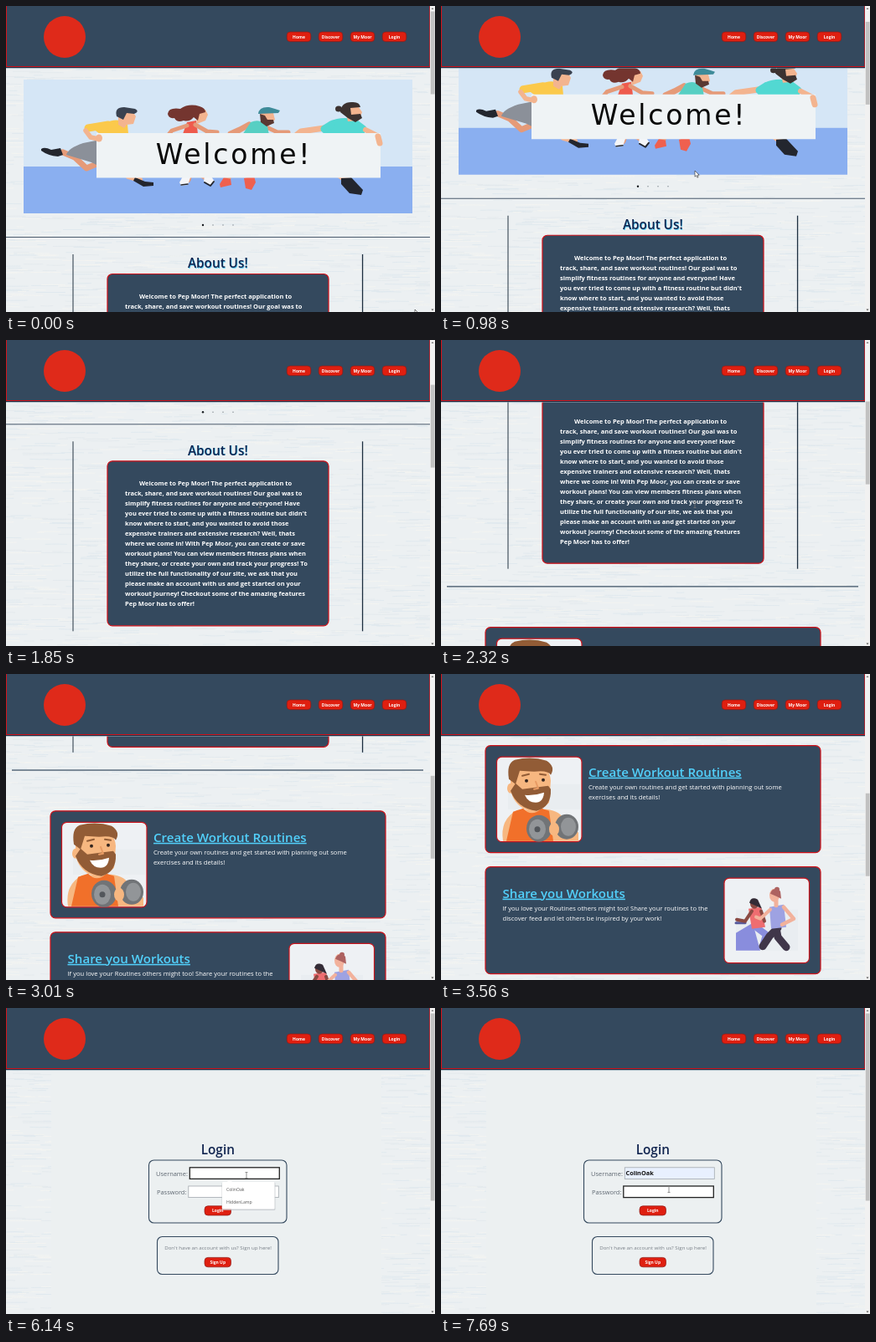
An HTML page for the animation above (8 s loop, 512 px wide and 366 px high).

```html
<!DOCTYPE html>
<html lang="en">
<head>
<meta charset="utf-8">
<title>Workout site</title>
<style>
html, body { margin: 0; width: 100%; height: 100%; overflow: hidden; background: #ecf0f2; }
svg { display: block; width: 100vw; height: 100vh; }
text { font-family: "Open Sans", "Noto Sans", sans-serif; white-space: pre; }
.mid { text-anchor: middle; }
.title { font-weight: 600; font-size: 15.3px; fill: #10244f; }
.about { font-weight: 700; font-size: 7.5px; fill: #fff; }
.link { font-weight: 600; font-size: 15.1px; fill: #52d0fb; text-decoration: underline; }
.body { font-weight: 500; font-size: 7.6px; fill: #fff; }
.label { font-size: 7.45px; fill: #5d6670; }
.note { font-size: 6.15px; fill: #777e86; }
.item { font-size: 5.1px; fill: #555; }
.value { font-weight: 700; font-size: 7.3px; fill: #111; }
.btn { font-weight: 700; font-size: 5px; fill: #fff; text-anchor: middle; }
.slide { font: 33px "DejaVu Sans", sans-serif; letter-spacing: 2.8px; fill: #080808; }
.panel { fill: #34495e; stroke: #d01018; stroke-width: 1.2; }
.thumbnail { fill: #eef1f4; stroke: #c9141c; stroke-width: 1.2; }
.form { fill: #ecf0f1; stroke: #34495e; stroke-width: 1.1; }
.limb { fill: none; stroke-linecap: round; stroke-linejoin: round; }
</style>
</head>
<body>
<svg id="stage" viewBox="0 0 512 366" preserveAspectRatio="none"></svg>
<script>
const LOOP = 8000;

const rect = (x, y, w, h, fill, extra = '') =>
  `<rect x="${x}" y="${y}" width="${w}" height="${h}" fill="${fill}" ${extra}/>`;
const box = (cls, x, y, w, h, r = 6) =>
  `<rect class="${cls}" x="${x}" y="${y}" width="${w}" height="${h}" rx="${r}"/>`;
const text = (cls, x, y, s) => `<text class="${cls}" x="${x}" y="${y}">${s}</text>`;
const shape = (fill, d) => `<path fill="${fill}" d="${d}"/>`;
const limb = (color, width, d) => `<path class="limb" stroke="${color}" stroke-width="${width}" d="${d}"/>`;
const ball = (fill, x, y, rx, ry = rx) => `<ellipse cx="${x}" cy="${y}" rx="${rx}" ry="${ry}" fill="${fill}"/>`;
const button = (x, y, w, h, s) =>
  rect(x, y, w, h, '#df1f10', 'rx="4" stroke="#8d1a18" stroke-width=".7"') + text('btn', x + w / 2, y + h / 2 + 1.9, s);

function streaks() {
  let seed = 7;
  const rnd = () => (seed = seed * 16807 % 2147483647) / 2147483647;
  return ['#dde8ee', '#e2e9ed', '#f5f5f2'].map(color => {
    let d = '';
    for (let i = 0; i < 330; i++) {
      const len = 8 + rnd() * 34;
      d += `M${(rnd() * 530 - 20).toFixed(1)} ${(74 + rnd() * 292).toFixed(1)}q${(len / 2).toFixed(1)} ${(rnd() * 2 - 1).toFixed(1)} ${len.toFixed(1)} 0`;
    }
    return `<path d="${d}" fill="none" stroke="${color}" stroke-width=".8"/>`;
  }).join('');
}

function runners() {
  const pale = '#f3b48f', tan = '#e59a78', shoe = '#23262e', navy = '#3a4250';
  const behind =
    // yellow shirt, one leg kicked back
    limb(tan, 7, 'M68 175L82 181L96 194L108 189') +
    shape(shoe, 'M42 171Q46 168 54 172L65 170L68 178L62 180Q50 179 42 173Z') +
    shape('#8b9099', 'M92 164L112 160V192L102 187L72 178Q74 170 92 164Z') +
    shape('#fbc94b', 'M118 140Q134 132 145 142L146 153H112L104 147Z') +
    limb('#fbc94b', 9, 'M122 142L98 146') + limb(pale, 5.5, 'M95 149L101 157L110 159') +
    shape(pale, 'M134 126H151L155 132L152 141L144 142L141 146L134 142Z') +
    shape(navy, 'M132 132Q129 121 141 121L154 123Q160 126 153 129L144 128L140 136Z') +
    limb(pale, 6, 'M146 204L160 208') + shape(shoe, 'M154 205L166 210L176 211V215L164 216L152 209Z') +
    // red shirt, loose hair
    shape('#ee5b4d', 'M216 139L227 137L229 153H211Z') + limb(tan, 5, 'M216 143L198 149L193 155') +
    limb(tan, 5, 'M226 142L240 150L252 151') +
    shape(pale, 'M225 124L238 124L241 130L238 137L228 141Z') +
    shape('#74352f', 'M231 120Q218 116 208 123Q194 121 193 129Q194 135 201 134Q204 140 212 137Q219 139 224 133L229 137L231 129L238 127Q238 122 231 120Z') +
    limb(tan, 7, 'M219 202L217 208') + shape('#f4f5f8', 'M212 202L220 205L217 214L209 215L207 211Z') +
    limb(shoe, 1.5, 'M209 214L217 213') +
    limb(tan, 7, 'M234 202L240 206') + shape('#f4f5f8', 'M237 202L245 204L249 210L244 215L236 210Z') +
    limb(shoe, 2, 'M237 211L244 215L248 210') +
    // cap, tank top
    limb(tan, 7, 'M290 142L279 148L268 153') + limb(tan, 5, 'M311 145L324 151L337 151') +
    shape('#57cfc3', 'M292 139Q304 134 312 144L314 154H282Z') +
    shape(pale, 'M304 128H319L321 136L312 143L304 137Z') +
    shape('#5a3932', 'M303 129L309 131L312 136L319 136L320 140L311 144L304 139Z') +
    shape('#3e8b99', 'M301 129Q302 120 314 121L321 123L327 125L325 128Z') +
    limb(tan, 7, 'M266 203L264 209') + shape('#ef604f', 'M260 205L268 207L269 214L256 217L255 213Z') +
    limb(tan, 7, 'M288 203L292 207') + shape('#ef604f', 'M284 206L296 203L298 211L293 220L286 218Z') +
    // bun and beard
    limb(pale, 7, 'M380 146L352 150L347 154') +
    shape('#52d8d2', 'M386 138Q401 131 418 136L428 147V154H377Z') + limb('#52d8d2', 9, 'M388 142L380 147') +
    limb('#52d8d2', 9, 'M418 141L426 147') + limb(pale, 6, 'M429 148L441 154') +
    shape(pale, 'M404 121H421L425 127L421 137L408 138Z') +
    shape('#3c3230', 'M399 127Q400 115 412 115Q422 114 423 121L411 122L412 130L423 129L425 134L417 139L408 134Z') +
    ball('#3c3230', 397, 123, 4, 3.5) +
    limb(pale, 9, 'M399 202L407 208') + shape(shoe, 'M400 206L412 205L426 220L424 226L410 224L400 213Z');
  const hands = ball(pale, 111, 158, 4, 4.5) + limb(pale, 7, 'M444 156L446 164');
  return behind + rect(108, 152, 339, 53.5, '#eff3f5') + hands + text('slide mid', 272, 188.5, 'Welcome!');
}

const lifter = () => {
  const skin = '#f7b780', hair = '#925c36', metal = '#717477';
  return rect(80, 640, 86, 30, '#e9edf0') +
    shape(skin, 'M74 708Q70 682 91 671L126 670Q143 672 148 684L164 698V708Z') +
    shape('#f1702a', 'M78 708L86 673L98 669Q108 680 120 669L129 672L134 708Z') +
    shape(skin, 'M83 632Q82 616 104 615Q130 616 131 636L129 662Q116 677 98 669Q84 660 83 644Z') +
    ball(skin, 83, 645, 4, 6) +
    shape(hair, 'M83 648L89 639L97 646L112 644L128 642L131 646Q132 667 114 672Q91 669 83 648Z') +
    shape('#fff', 'M100 653Q112 654 123 650Q122 662 113 662Q104 662 100 653Z') +
    shape(hair, 'M81 634Q78 615 88 611Q108 606 126 612Q137 619 131 629Q128 623 111 625L94 624L89 640Z') +
    ball('#35261f', 102, 636, 2) + ball('#35261f', 122, 635, 2) + limb(hair, 2, 'M97 630L105 628M118 628L125 629') +
    limb('#e89b64', 2, 'M113 637L116 645L111 646') +
    limb(skin, 11, 'M137 681L153 690L142 702') +
    limb('#4f5358', 6, 'M114 696L154 690') + ball(metal, 117, 693, 15, 16) + ball('#929598', 115, 694, 10, 12) +
    ball(metal, 150, 691, 14, 15) + ball('#929598', 152, 691, 9, 11) + ball('#53575c', 115, 694, 3.5) + ball(skin, 135, 694, 6, 8);
};

const treadmill = () => {
  const dark = '#8b4a43', light = '#f2b19b', violet = '#898ddd', lilac = '#9ea2e2', black = '#40364a';
  return rect(352, 790, 74, 49, '#e9edf1') +
    limb('#565a9c', 3, 'M352 806H363') + shape(violet, 'M352 818L372 806L381 839H352Z') +
    limb(violet, 8, 'M376 811L388 820L384 834') +
    shape('#ee6d70', 'M367 789L382 787L387 811L371 813Z') + limb(dark, 4, 'M371 792L363 804L353 802') + limb(dark, 4, 'M382 792L386 804') +
    ball(dark, 374, 783, 5, 6) + shape('#332c36', 'M368 782Q370 774 378 778L383 789L377 786Z') +
    limb(black, 9, 'M400 812L402 823L412 835') + limb(black, 9, 'M402 812L392 822L384 834') +
    shape(lilac, 'M392 787L409 784L412 811L394 813Z') + limb(light, 4.5, 'M409 787L421 801L407 808') + limb(light, 4, 'M393 790L381 801L376 799') +
    ball(light, 398, 773, 6, 8) + limb(light, 5, 'M400 779V785') +
    shape('#ad6260', 'M393 771Q396 762 405 768L406 777L400 774Z') + ball('#ad6260', 401, 766, 3);
};

const stretcher = () =>
  limb('#3d4047', 1, 'M92 913Q103 907 113 912M80 926Q82 920 88 917') +
  limb('#f2b08d', 5, 'M99 925L112 914L121 910M87 928L106 922') +
  ball('#f2b08d', 84, 926, 5) + shape('#4b3434', 'M78 926Q80 918 88 922L83 931Z') +
  shape('#5866a2', 'M92 924L106 918L124 930L106 938Z');

const ABOUT = `track, share, and save workout routines! Our goal was to
simplify fitness routines for anyone and everyone! Have
you ever tried to come up with a fitness routine but didn't
know where to start, and you wanted to avoid those
expensive trainers and extensive research? Well, thats
where we come in! With Pep Moor, you can create or save
workout plans! You can view members fitness plans when
they share, or create your own and track your progress! To
utilize the full functionality of our site, we ask that you
please make an account with us and get started on your
workout journey! Checkout some of the amazing features
Pep Moor has to offer!`.split('\n');

const card = (y, textX, imageX, title, lines, art) =>
  box('panel', 53, y, 400, 128) + text('link', textX, y + 37, title) +
  lines.map((s, i) => text('body', textX, y + 52.5 + i * 12, s)).join('') +
  box('thumbnail', imageX, y + 13.5, 101.5, 101.5) + art;

const home =
  rect(21, 88, 464, 104, '#d5e6f6') + rect(21, 192, 464, 56, '#8aaff0') + runners() +
  [235, 247, 259, 271].map((x, i) => ball(i ? '#8d959b' : '#15191d', x, 262, i ? .8 : 1.2)).join('') +
  rect(0, 276, 506, 1, '#4a5a6c') +
  rect(79.4, 297, 1.2, 227, '#46535f') + rect(424.9, 297, 1.3, 227, '#1d2f40') +
  `<text class="title mid" x="253.5" y="313.9" style="fill:#5ccff5">About Us!</text>` + text('title mid', 252.8, 313.4, 'About Us!') +
  box('panel', 121, 320.5, 264, 197) +
  text('about', 159, 350, 'Welcome to Pep Moor! The perfect application to') +
  ABOUT.map((s, i) => text('about', 142, 362 + i * 12, s)).join('') +
  rect(7, 544.6, 491, 1.2, '#34495e') +
  card(594, 176, 66.5, 'Create Workout Routines',
    ['Create your own routines and get started with planning out some', 'exercises and its details!'], lifter()) +
  card(739, 73.5, 338, 'Share you Workouts',
    ['If you love your Routines others might too! Share your routines to the', 'discover feed and let others be inspired by your work!'], treadmill()) +
  card(884, 176, 66.5, 'Get inspired by other Users', [], stretcher());

const login =
  rect(54, 74, 394, 292, '#ecf0f1') +
  text('title mid', 252.8, 175, 'Login') +
  box('form', 170.5, 182, 164.5, 75) + text('label', 179, 200.7, 'Username:') + text('label', 180, 222.7, 'Password:') +
  `<rect id="user" x="219.3" y="190.8" width="107" height="13.6"/><rect id="pass" x="217.8" y="213" width="107.5" height="13.6"/>` +
  `<g id="filled">${text('value', 220.5, 200.3, 'ColinOak')}</g>` +
  button(237, 236.8, 31.5, 11.2, 'Login') +
  box('form', 180.5, 273.5, 144.5, 45) + text('note mid', 253, 289, 'Don\'t have an account with us? Sign up here!') +
  button(237, 298.4, 31.5, 11.4, 'Sign Up') +
  `<g id="menu">${rect(257.5, 208.5, 64, 33.5, '#bfc4c8', 'rx="1.5" opacity=".7"')}
   ${shape('#fff', 'M263 208.5L267 205.5L271 208.5Z')}${rect(258, 208, 62.5, 32.5, '#fff', 'rx="1"')}
   <rect id="row" x="258" y="211" width="62.5" height="13" fill="#eceef0"/>
   ${text('item', 263, 219.2, 'ColinOak')}${text('item', 263, 233.5, 'HiddenLamp')}</g>`;

const header =
  rect(0, 73, 506, 2, '#8fa0ae', 'opacity=".6"') + rect(0, 0, 506, 74, '#1b3148') +
  rect(0, 0, 506, 73, '#d3141c') + rect(1, 0, 504.3, 72, '#34495e') +
  ball('#df2a1a', 70, 37, 25) +
  ['Home', 'Discover', 'My Moor', 'Login'].map((s, i) => button(335.2 + i * 38, 31, 28.6, 11.6, s)).join('');

const scrollbar = rect(506, 0, 6, 366, '#f1f1f1') +
  '<rect id="thumb" x="506.8" width="4.8" fill="#c1c1c1"/>' +
  shape('#777', 'M507.5 4L509 2L510.5 4Z') + shape('#555', 'M507.5 362.5L509 364.5L510.5 362.5Z');

const pointer = `<g id="pointer">
  <path id="arrow" d="M0 0V7.2L1.7 5.7L2.9 8.2L4.1 7.6L3 5.2H5.2Z" fill="#fff" stroke="#222" stroke-width=".6"/>
  <path id="beam" d="M-1.5 -3.5H1.5M0 -3.5V3.5M-1.5 3.5H1.5" stroke="#777" stroke-width=".8"/></g>`;

document.getElementById('stage').innerHTML =
  rect(0, 0, 512, 366, '#ecf0f2') + streaks() +
  `<g id="home">${home}</g><g id="login">${login}</g>` + header + scrollbar + pointer;

// [time, scroll offset]
const SCROLL = [[800, 0], [1250, 115], [1300, 115], [1380, 122], [1580, 160], [1800, 160], [2060, 240], [2260, 240],
  [2320, 250], [2670, 360], [2820, 360], [3010, 430], [3280, 480], [3430, 480], [3800, 560]];
// [time, x, y]
const POINTER = [[70, 488, 363], [330, 405, 232], [490, 405, 232], [760, 303, 197], [3820, 303, 197], [4230, 430, 96],
  [4300, 436, 88], [4440, 459, 48], [4620, 463, 36], [5120, 463, 36], [5810, 287, 197], [5930, 287, 199],
  [6140, 287, 200], [6450, 285, 216], [6900, 285, 216], [7430, 272, 217]];
const CURSOR = [[0, 'arrow'], [1850, 'beam'], [2820, ''], [3820, 'arrow'], [5750, 'beam'], [6250, 'arrow'], [6800, 'beam']];
const LOGIN_AT = 5120, FOCUS_AT = 5930, PREVIEW_AT = 6350, PICK_AT = 6800, PASSWORD_AT = 7610;

function sample(keys, t) {
  const next = keys.findIndex(k => k[0] > t);
  if (next === 0) return keys[0].slice(1);
  if (next < 0) return keys[keys.length - 1].slice(1);
  const a = keys[next - 1], b = keys[next], p = (t - a[0]) / (b[0] - a[0]);
  return a.slice(1).map((v, i) => v + (b[i + 1] - v) * p);
}

const el = id => document.getElementById(id);
const show = (id, on) => { el(id).style.display = on ? '' : 'none'; };
const set = (id, attrs) => Object.entries(attrs).forEach(([k, v]) => el(id).setAttribute(k, v));
const field = (id, focused, fill) =>
  set(id, { fill, stroke: focused ? '#222' : '#a2a8ae', 'stroke-width': focused ? 1.3 : .8 });

function draw(t) {
  const onLogin = t >= LOGIN_AT;
  const scroll = onLogin ? 0 : sample(SCROLL, t)[0];
  show('home', !onLogin);
  show('login', onLogin);
  set('home', { transform: `translate(0 ${-scroll})` });
  set('thumb', { y: 6.5 + scroll * .268, height: onLogin ? 224 : 99 });

  field('user', t >= FOCUS_AT && t < PASSWORD_AT, t >= PREVIEW_AT ? '#e8f0fe' : '#fff');
  field('pass', t >= PASSWORD_AT, '#fff');
  show('filled', t >= PREVIEW_AT);
  show('menu', t >= FOCUS_AT && t < PICK_AT);
  show('row', t >= PREVIEW_AT);

  const kind = CURSOR.filter(c => c[0] <= t).pop()[1];
  show('arrow', kind === 'arrow');
  show('beam', kind === 'beam');
  set('pointer', { transform: `translate(${sample(POINTER, t).join(' ')})` });
}

function tick() {
  draw(performance.now() % LOOP);
  requestAnimationFrame(tick);
}
tick();
</script>
</body>
</html>
```
